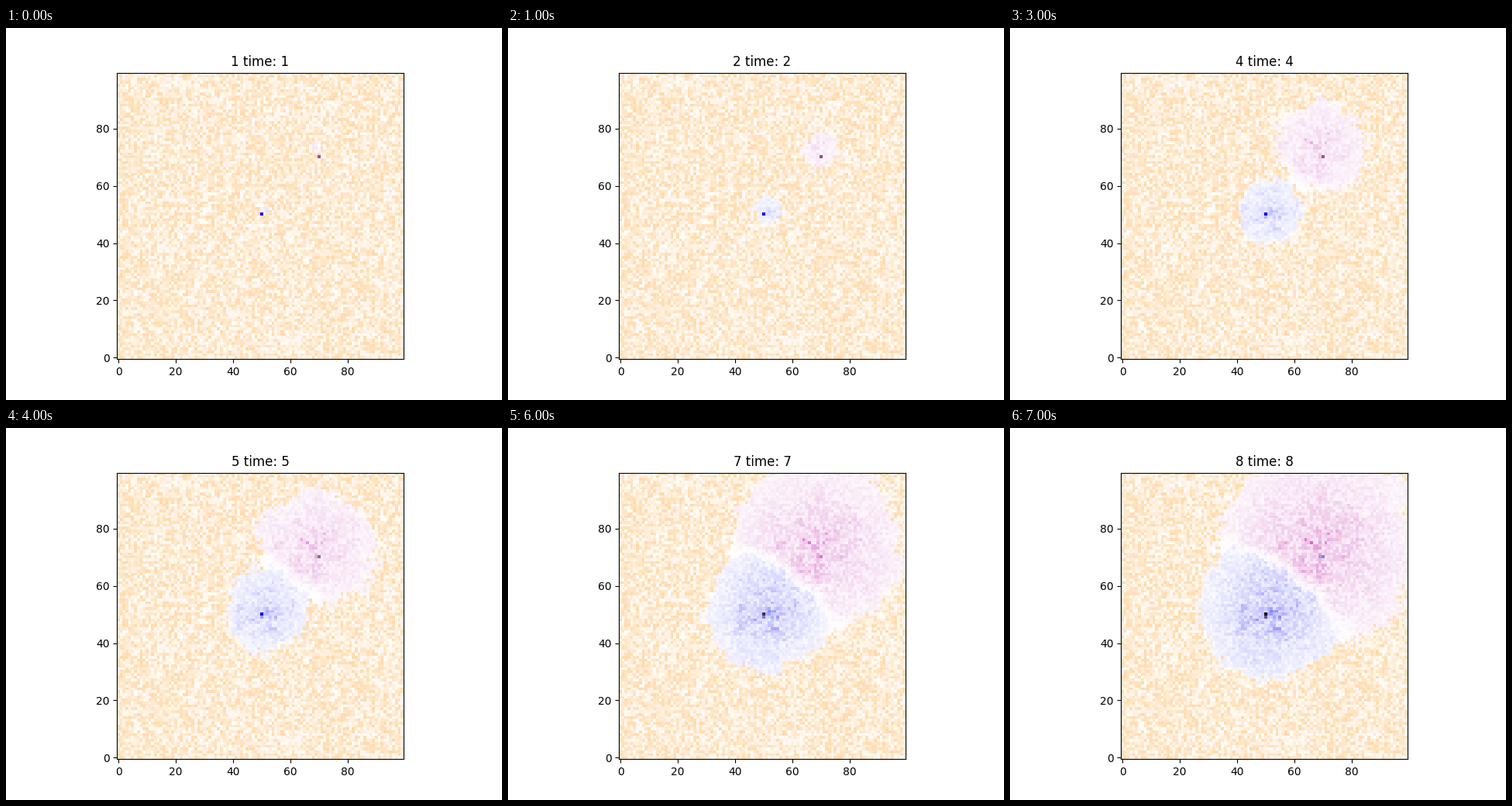
A matplotlib script for the animation above (8 s loop, 640x480 px).

```python
import numpy as np
import matplotlib.pyplot as plt
from matplotlib.animation import FuncAnimation
from matplotlib.colors import to_rgb

N = 100
STEPS = 8
LEAD = 1.1  # how much later blue may arrive and still keep a cell

rng = np.random.default_rng(7)
Y, X = np.mgrid[0:N, 0:N]


def smooth_noise(width):
    """Unit-variance noise blurred over a few cells."""
    field = rng.normal(size=(N, N))
    for axis in (0, 1):
        field = sum(np.roll(field, k, axis) for k in range(-width, width + 1))
    return field / field.std()


def arrival(cx, cy, speed):
    """Time at which a ragged growing disc reaches each cell."""
    dist = np.hypot(X - cx, Y - cy)
    ragged = 0.25 * smooth_noise(3) + 0.22 * rng.normal(size=(N, N))
    return 1 + (dist - 1.3) / speed + ragged * np.clip(dist / 8, 0, 1)


def density(hot_x, hot_y):
    """Grainy gain per cell with streaks that strengthen near a hot spot."""
    dist = np.hypot(X - hot_x, Y - hot_y)
    streaks = 0.8 * np.clip(smooth_noise(1), 0, 2) * np.exp(-dist / 12)
    core = 0.8 * np.exp(-(dist / 2.5) ** 2)
    return rng.uniform(0.3, 1.4, (N, N)) * (0.95 + streaks + core)


class Colony:
    def __init__(self, start, hot, speed, growth, drop):
        self.time = arrival(*start, speed)
        self.gain = density(*hot)
        self.growth = growth
        self.drop = np.array(drop)

    def paint(self, img, t, allowed=True):
        age = t - self.time
        mask = (age >= 0) & allowed
        strength = (0.05 + self.growth * age) * self.gain
        img[mask] = 1 - np.clip(strength[mask], 0, 0.6)[:, None] * self.drop


def paint_core(img, t, x, y, dx, dy, times, colours):
    """Core cell fading through key colours, tinting one neighbour later on."""
    keys = np.array([to_rgb(c) for c in colours])
    colour = np.array([np.interp(t, times, channel) for channel in keys.T])
    img[y, x] = colour
    blend = np.interp(t, [2, 8], [0, 0.6])
    img[y + dy, x + dx] += blend * (colour - img[y + dy, x + dx])


sand = 1 - rng.random((N, N, 1)) * np.array([0, 0.145, 0.33])
blue = Colony((51.5, 51.8), (54, 50), 3.35, 0.023, (1, 1, 0))
pink = Colony((69, 73), (67, 74), 4.75, 0.022, (0.27, 1, 0.38))

# the colonies stay pale along the front where they meet
front = blue.time - pink.time - LEAD
blue.gain *= np.clip(-front / 0.7, 0.3, 1)
pink.gain *= np.clip(front / 1.5, 0.15, 1)


def picture(t):
    img = sand.copy()
    pink.paint(img, t)
    blue.paint(img, t, front < 0)
    paint_core(img, t, 50, 50, 0, -1, [1, 5, 6, 8],
               ["#0000ff", "#0000ff", "#5a5a82", "#190a28"])
    paint_core(img, t, 70, 70, -1, 0, [1, 3, 6, 7, 8],
               ["#a546a5", "#9b468c", "#8c7d91", "#d778cd", "#8c7dd7"])
    return img


fig, ax = plt.subplots(figsize=(6.4, 4.8), dpi=100)
image = ax.imshow(picture(1), origin="lower")
title = ax.set_title("1 time: 1")


def update(frame):
    t = frame + 1
    image.set_data(picture(t))
    title.set_text(f"{t} time: {t}")
    return image, title


anim = FuncAnimation(fig, update, frames=STEPS, interval=1000, repeat=True,
                     repeat_delay=0, blit=False)
plt.show()
```
